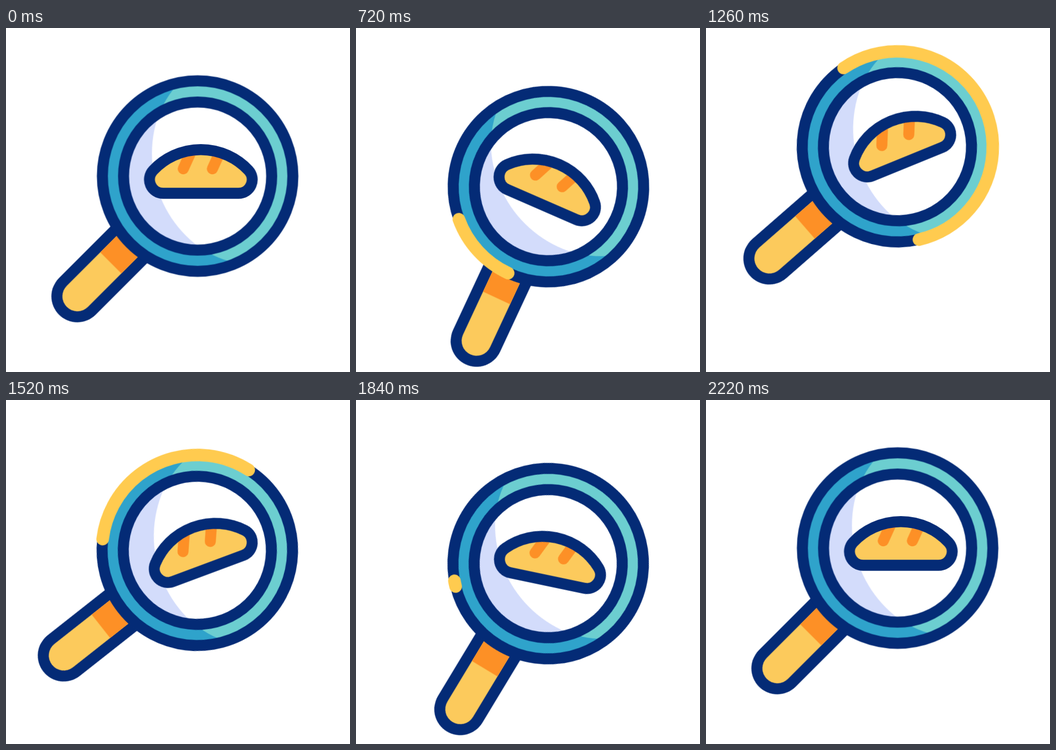
Animation of 640 by 640 pixels, one loop 2400 ms. Source, as an HTML page:

```html
<!DOCTYPE html>
<html lang="en">
<head>
<meta charset="utf-8">
<title>Bread under a magnifying glass</title>
<style>
  @property --head { syntax: "<length>"; inherits: false; initial-value: 0px; }
  @property --tail { syntax: "<length>"; inherits: false; initial-value: 0px; }

  html, body { margin: 0; width: 100%; height: 100%; overflow: hidden; background: #fff; }
  svg { display: block; width: 100vw; height: 100vh; }

  .line { stroke: #042b76; stroke-width: 20.5; }
  .round { stroke-linecap: round; stroke-linejoin: round; }

  .anim {
    animation-duration: 2400ms;
    animation-iteration-count: infinite;
    animation-timing-function: cubic-bezier(.3333, 0, .6667, 1);
  }
  .glass-bob { animation-name: glass-bob; }
  .glass-turn { animation-name: glass-turn; transform-origin: 0 -4.5px; }
  .bread-sway { animation-name: bread-sway; }
  .bread-bob { animation-name: bread-bob; }
  .bread-turn { animation-name: bread-turn; }
  .sweep {
    animation-name: head, tail, show;
    animation-timing-function: cubic-bezier(.3333, 0, .6667, 1), cubic-bezier(.3333, 0, .6667, 1), step-end;
    stroke-dasharray: calc(var(--head) - var(--tail)) 2000px;
    stroke-dashoffset: calc(var(--tail) * -1);
  }

  @keyframes glass-bob {
    0%, 8.333% { transform: translateY(0); }
    29.167% { transform: translateY(20.4px); }
    50% { transform: translateY(-58.3px); }
    70.833%, 75% { transform: translateY(30px); }
    91.667%, 100% { transform: translateY(0); }
  }
  @keyframes glass-turn {
    0%, 8.333% { transform: rotate(0deg); }
    33.333% { transform: rotate(-21deg); }
    60.208% { transform: rotate(10deg); }
    74.167% { transform: rotate(-14.7deg); }
    91.667%, 100% { transform: rotate(0deg); }
  }
  @keyframes bread-sway {
    0%, 8.333% { transform: translateX(0); }
    33.333% { transform: translateX(-.7px); }
    43.75% { transform: translateX(-5px); }
    63.333% { transform: translateX(-.8px); }
    76.667% { transform: translateX(1.5px); }
    91.667%, 100% { transform: translateX(0); }
  }
  @keyframes bread-bob {
    0%, 8.333% { transform: translateY(0); }
    29.167% { transform: translateY(24.8px); }
    50% { transform: translateY(-60px); }
    70%, 73.333% { transform: translateY(32px); }
    91.667%, 100% { transform: translateY(0); }
  }
  @keyframes bread-turn {
    0%, 8.333% { transform: rotate(0deg); }
    33.333% { transform: rotate(24.7deg); }
    58.333% { transform: rotate(-29.6deg); }
    75% { transform: rotate(12.2deg); }
    91.667%, 100% { transform: rotate(0deg); }
  }
  @keyframes head {
    0%, 20.833% { --head: 0px; }
    62.5%, 100% { --head: 1114.6px; }
  }
  @keyframes tail {
    0%, 37.5% { --tail: 0px; }
    79.167%, 100% { --tail: 1114.6px; }
  }
  @keyframes show {
    0% { visibility: hidden; }
    21% { visibility: visible; }
    79.1%, 100% { visibility: hidden; }
  }
</style>
</head>
<body>
<svg viewBox="0 0 640 640" fill="none">
  <defs>
    <clipPath id="rim"><circle r="177"/></clipPath>
    <clipPath id="pane"><circle r="137"/></clipPath>
  </defs>

  <g transform="translate(356.5 275.5)">
    <g class="anim glass-bob">
      <g class="anim glass-turn">
        <!-- handle, drawn along x -->
        <g transform="rotate(135)">
          <path class="round" d="M170 0H316.4" stroke="#042b76" stroke-width="96.6"/>
          <path class="round" d="M170 0H316.4" stroke="#fcca5c" stroke-width="55.6"/>
          <path d="M150 0H228.4" stroke="#fd9026" stroke-width="55.6"/>
        </g>
        <!-- rim -->
        <circle r="177" fill="#2fa3cb"/>
        <circle cx="116" cy="-37" r="203.7" fill="#6cced0" clip-path="url(#rim)"/>
        <circle class="line" r="177.2"/>
        <!-- pane -->
        <circle r="137" fill="#d3dcfb"/>
        <g clip-path="url(#pane)"><circle cx="131.5" cy="-42" r="216.5" fill="#fff"/></g>
        <circle class="line" r="137.8"/>
        <path class="anim sweep round" stroke="#ffcb4f" stroke-width="23.4"
          d="M-177.4 0A177.4 177.4 0 0 0 177.4 0A177.4 177.4 0 0 0 -177.4 0"/>
      </g>
    </g>
  </g>

  <g transform="translate(362.5 267)">
    <g class="anim bread-sway">
      <g class="anim bread-bob">
        <g class="anim bread-turn">
          <path id="loaf" fill="#fcca5c"
            d="M-70 40.5H70A25.4 25.4 0 0 0 88.6 -2.3A121.2 121.2 0 0 0 -88.6 -2.3A25.4 25.4 0 0 0 -70 40.5Z"/>
          <path class="round" d="M-32.7 -5L-20 -33M21.5 -5L34.2 -33" stroke="#fd9026" stroke-width="20.5"/>
          <path class="line round"
            d="M-70 40.5H70A25.4 25.4 0 0 0 88.6 -2.3A121.2 121.2 0 0 0 -88.6 -2.3A25.4 25.4 0 0 0 -70 40.5Z"/>
        </g>
      </g>
    </g>
  </g>
</svg>
</body>
</html>
```
